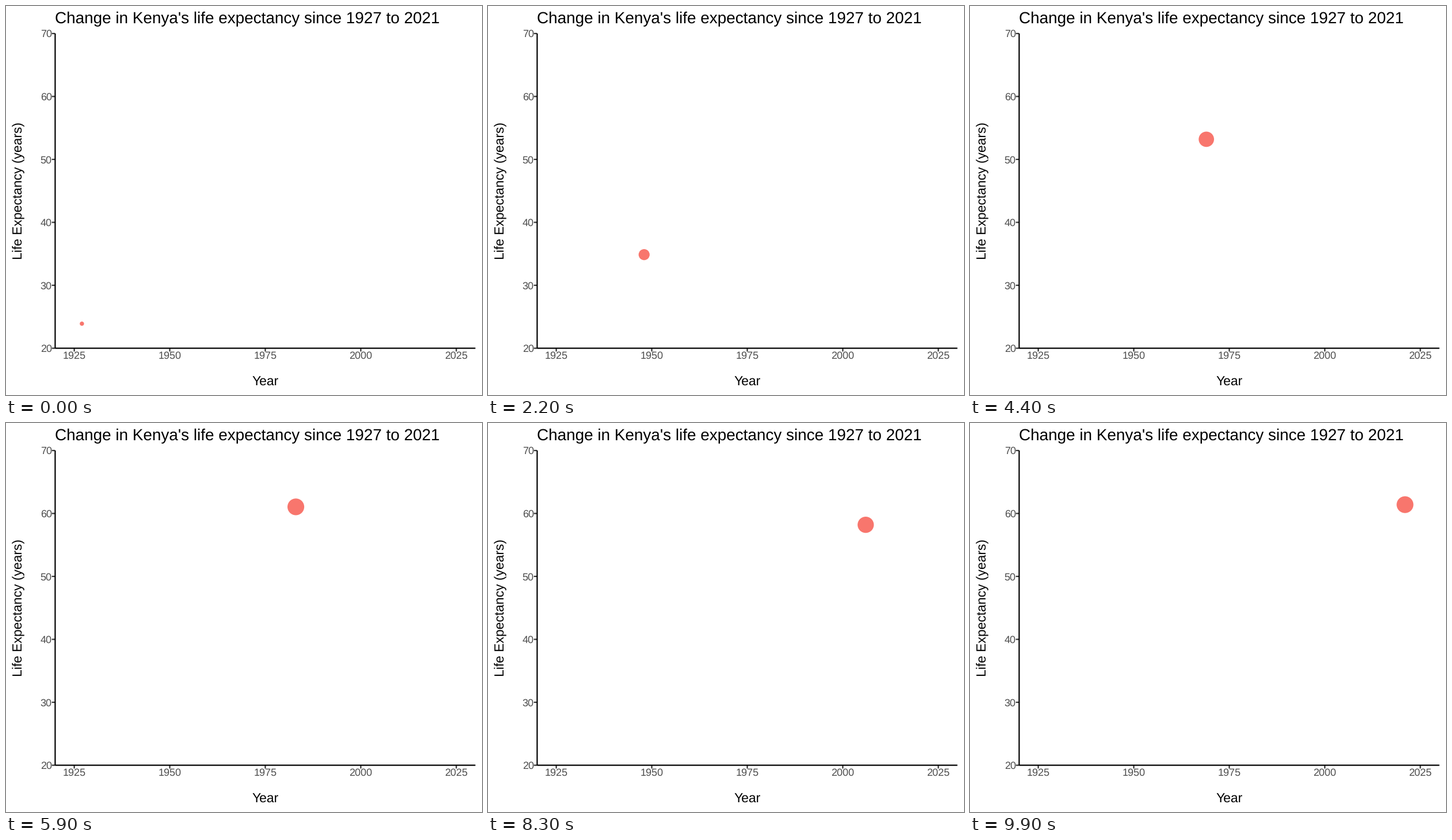
A matplotlib script for the animation above (10 s loop, 827x677 px).

```python
import numpy as np
import matplotlib.pyplot as plt
from matplotlib.animation import FuncAnimation
from matplotlib.patches import Circle

W, H, DPI = 827, 677, 150
FRAMES, INTERVAL = 100, 100
LEFT, RIGHT, TOP, BOTTOM = 85.4, 815.54, 47.9, 595.6
TICK = 5.73
START, END = 1927, 2021

plt.rcParams["font.family"] = "Liberation Sans"
plt.rcParams["text.hinting"] = "none"

# Turning points of the curve: year, life expectancy.
TURNS = [
    (START, 23.9), (1937, 26.35), (1948, 34.87), (1958, 46.85),
    (1969, 53.2), (1979, 57.7), (1983, 61.05), (1990, 58.6), (1992, 57.3),
    (2000, 54.36), (2006, 58.2), (2011, 61.0), (2019, 62.9), (END, 61.4),
]
turn_years, turn_ages = np.array(TURNS).T
LOW, HIGH = turn_ages.min(), turn_ages.max()

# Every year lands on a whole frame; the few spare frames fall between years.
years = np.arange(START, END + 1)
year_frames = np.round((years - START) * (FRAMES - 1) / (END - START))


def px(year):
    return LEFT + (year - 1920) / 110 * (RIGHT - LEFT)


def py(age):
    return BOTTOM - (age - 20) / 50 * (BOTTOM - TOP)


def dot_radius(age):
    return 3.7 + 11.11 * np.sqrt((age - LOW) / (HIGH - LOW))


fig = plt.figure(figsize=((W + 1e-6) / DPI, (H + 1e-6) / DPI), dpi=DPI,
                 facecolor="white")
ax = fig.add_axes([0, 0, 1, 1])
ax.set_xlim(0, W)
ax.set_ylim(H, 0)
ax.axis("off")


def line(x, y, color="black"):
    ax.plot(x, y, color=color, lw=1.067, solid_capstyle="butt", snap=False)


def label(x, y, text, size, color="black", ha="center", **kw):
    ax.text(x, y, text, fontsize=size, color=color, ha=ha, va="baseline", **kw)


def tick(x, y, text, text_x, text_y, ha):
    line(x, y, "#333333")
    label(text_x, text_y, text, 8.64, "#4D4D4D", ha)


for age in range(20, 71, 10):
    y = py(age)
    tick([LEFT - TICK, LEFT], [y, y], age, LEFT - TICK, y + 6.4, "right")

for year in range(1925, 2026, 25):
    x = px(year)
    tick([x, x], [BOTTOM, BOTTOM + TICK], year, x, BOTTOM + 18.6, "center")

line([LEFT, LEFT], [TOP, BOTTOM])
line([LEFT, RIGHT], [BOTTOM, BOTTOM])

label(LEFT, 30.6, "Change in Kenya's life expectancy since 1927 to 2021",
      13.37, ha="left")
label((LEFT + RIGHT) / 2, 660.7, "Year", 11)
label(28.1, (TOP + BOTTOM) / 2, "Life Expectancy (years)", 11,
      rotation=90, rotation_mode="anchor")

dot = ax.add_patch(Circle((0, 0), 1, fc="#F8766D", ec="none", zorder=3))


def update(i):
    year = np.interp(i, year_frames, years)
    age = np.interp(year, turn_years, turn_ages)
    dot.center = px(year), py(age)
    dot.set_radius(dot_radius(age))
    return dot,


anim = FuncAnimation(fig, update, frames=FRAMES, interval=INTERVAL,
                     repeat=True, repeat_delay=0)
plt.show()
```
